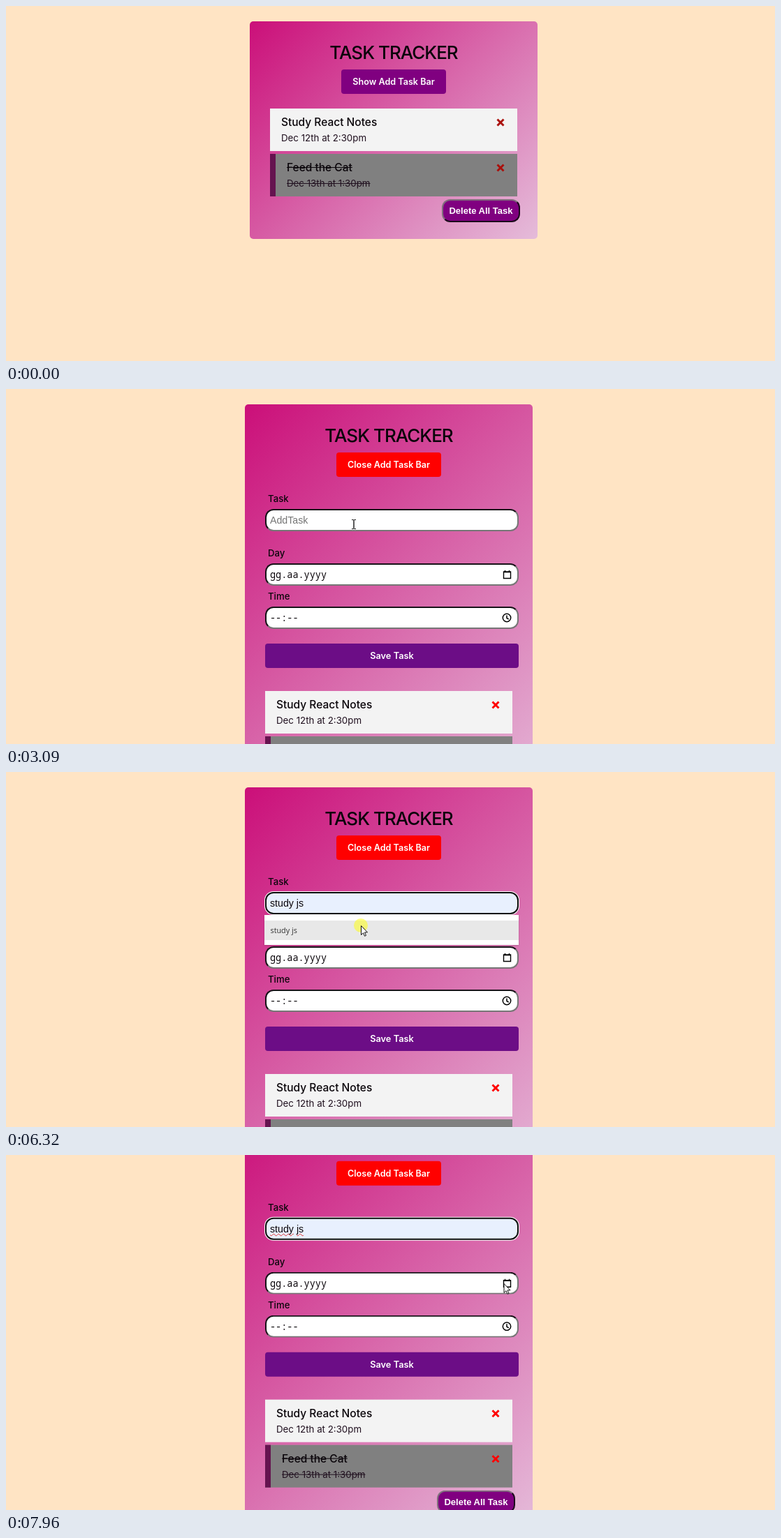
An HTML page for the animation above (8 s loop, 1101 px wide and 509 px high).

```html
<!DOCTYPE html>
<html lang="en">
<head>
<meta charset="utf-8">
<title>Task Tracker</title>
<style>
  * { box-sizing: border-box; }
  html, body { margin: 0; width: 100%; height: 100%; overflow: hidden; background: #ffe4c4; }
  body { position: relative; font-family: Inter, sans-serif; color: #0a050a; white-space: nowrap; }
  body div, #cursor { position: absolute; }

  #card { left: 349px; top: 22px; width: 412px; height: 312px; border-radius: 5px;
    background: linear-gradient(135deg, #cb0f79, #e5bcda); }
  #card.open { left: 342px; height: 598px; }
  #card.big { height: 322px; }
  #card.open.big { height: 608px; }

  #title { top: 25px; width: 100%; text-align: center; font: 500 26px/40px Inter, sans-serif; letter-spacing: -1px; }
  #toggle { left: 50%; top: 69px; width: 150px; height: 35px; transform: translateX(-50%); border-radius: 4px;
    background: #800080; color: #fff; text-align: center; font: 600 12.6px/35px Inter, sans-serif; }
  .big #toggle { width: 220px; height: 45px; font-size: 20.1px; line-height: 45px; }
  .open #toggle { background: #f00; }

  #content { left: 0; top: 0; width: 100%; }
  .big #content { top: 10px; }
  #form { display: none; left: 0; top: 0; width: 100%; }
  .open #form { display: block; }
  .label { left: 33px; font: 500 13.2px/20px Inter, sans-serif; }
  .field { left: 29px; width: 363px; height: 32.5px; padding-left: 5px; border: 2px solid;
    border-color: #181218 #767676 #767676 #181218; border-radius: 12px; background: #fff;
    font: 14.2px/28px "Liberation Sans", Arial, sans-serif; }
  .mono { font: 13.5px/29px "Noto Sans Mono", monospace; }
  .field svg { position: absolute; right: 8px; top: 7px; }
  .field.focus { border-color: #0c0c0c; box-shadow: 0 0 0 1px #fff; }
  .field.filled { background: #e8f0fe; }
  .hint { color: #757575; }
  .typo { text-decoration: underline wavy #e03030 .8px; text-underline-offset: 2px; text-decoration-skip-ink: none; }
  #caret { display: inline-block; width: 1px; height: 16px; margin-right: -1px; vertical-align: -3px; background: #000; }
  #save { left: 29px; top: 343px; width: 363px; height: 35px; border-radius: 4px; background: #6c0d86;
    color: #fff; text-align: center; font: 600 12.8px/35px Inter, sans-serif; }
  #menu { left: 28px; top: 183px; width: 364px; background: #fff; box-shadow: 0 1px 2px #0003;
    font: 10.8px/28px "Open Sans", sans-serif; color: #333; }
  #option { left: 0; right: 0; top: 8px; height: 28px; padding-left: 8.5px; }

  #list { left: 29px; top: 125px; width: 354px; }
  .open #list { top: 411px; }
  .task { left: 0; top: 0; width: 100%; height: 61px; background: #f3f3f3; }
  .task.done { top: 65px; background: #808080; border-left: 8px solid #65134f; }
  .task div { left: 16px; top: 10px; font: 500 15.5px/20px Inter, sans-serif; }
  .task div + div { top: 32px; font: 400 13.3px/20px Inter, sans-serif; color: #20101f; }
  .done div { text-decoration: line-through; }
  .task svg { position: absolute; right: 18px; top: 14px; stroke: #aa0f0b; }
  .open .task svg { stroke: #f00; }
  #delete { left: 246px; top: 130px; width: 112px; height: 33px; border: 2px solid;
    border-color: #80707c #1c0a1c #1c0a1c #80707c; border-radius: 12px; background: #800080; color: #fff;
    text-align: center; font: bold 13px/29px "Liberation Sans", Arial, sans-serif; }
  #cursor { left: 0; top: 0; overflow: visible; }
</style>
</head>
<body>
<div id="card">
  <div id="title">TASK TRACKER</div>
  <div id="toggle"></div>
  <div id="content">
    <div id="form">
      <div class="label" style="top:125px">Task</div>
      <div class="field" id="task" style="top:149.5px"><span id="typed"></span><i id="caret"></i><span class="hint" id="hint">AddTask</span></div>
      <div class="label" style="top:203px">Day</div>
      <div class="field mono" style="top:227.5px">gg.aa.yyyy<svg width="13" height="14" fill="none" stroke="#000" stroke-width="1.4"><path d="M1.5 3h10v9.5h-10zM1.5 3.6h10M3.5 1v2M9.5 1v2"/></svg></div>
      <div class="label" style="top:265px">Time</div>
      <div class="field mono" style="top:289.5px">--:--<svg width="14" height="14" fill="none" stroke="#000" stroke-width="1.5"><circle cx="7" cy="7" r="5.7"/><path d="M7 3.5v4l2.8 1.6"/></svg></div>
      <div id="save">Save Task</div>
    </div>
    <div id="list">
      <div class="task"><div>Study React Notes</div><div>Dec 12th at 2:30pm</div><svg width="12" height="12" stroke-width="2.9"><path d="M1.5 1.5l9 9m0-9l-9 9"/></svg></div>
      <div class="task done"><div>Feed the Cat</div><div>Dec 13th at 1:30pm</div><svg width="12" height="12" stroke-width="2.9"><path d="M1.5 1.5l9 9m0-9l-9 9"/></svg></div>
      <div id="delete">Delete All Task</div>
    </div>
    <div id="menu"><div id="option">study js</div></div>
  </div>
</div>
<svg id="cursor" width="1" height="1">
  <circle id="press" r="10" fill="#ff0" fill-opacity=".5"/>
  <path id="arrow" d="M.5 .5v13l3-2.8 2 4.6 2-.9-2-4.5h4z" fill="#fff" stroke="#111"/>
  <path id="hand" d="M-1.5 10V1.2q1.5-2 3 0V6q1.6-1 2.6.5 1.5-.8 2.5.6 1.9-.4 2 1.5v4q0 2-1.5 3.6V18h-7.4v-1.5L-5 11.8q-1.2-2 .5-2.6 1.2 0 3 2.3z" fill="#fff" stroke="#111"/>
  <path id="beam" d="M-3-6.5h2q1 0 1 1v11q0 1-1 1h-2M3-6.5H1q-1 0-1 1v11q0 1 1 1h2" fill="none" stroke="#222"/>
</svg>

<script>
const LOOP = 8000, BLINK = 530;
const $ = id => document.getElementById(id);
const within = (t, from, to) => t >= from && t < to;
const smooth = u => u * u * (3 - 2 * u);
const progress = (t, from, to) => smooth(Math.min(1, Math.max(0, (t - from) / (to - from))));

// Pointer stops: time, x, y
const stops = [
  [140, 1051, 484], [290, 785, 282], [450, 785, 282], [870, 549, 119],
  [2290, 549, 119], [2560, 498, 194], [5700, 498, 194], [5990, 508, 220],
  [6580, 508, 220], [6590, 509, 220], [6690, 509, 220], [7150, 645, 241],
  [7240, 645, 241], [7480, 646, 208], [7500, 646, 208], [7960, 712.5, 184],
];
// Typing: time, field value
const typing = [[4300, ""], [4640, "s"], [4710, "st"], [4910, "stu"], [6370, "study js"]];
const presses = [[1950, 2090], [4230, 4370], [6300, 6520]];

function pointerAt(t) {
  const i = stops.findIndex(s => s[0] > t);
  if (i < 0) return stops.at(-1).slice(1);
  if (i === 0) return stops[0].slice(1);
  const [t0, x0, y0] = stops[i - 1], [t1, x1, y1] = stops[i];
  const u = progress(t, t0, t1);
  return [x0 + (x1 - x0) * u, y0 + (y1 - y0) * u];
}

function show(id, on) {
  $(id).style.display = on ? "" : "none";
}

function drawField(t) {
  const [since, value] = typing.findLast(k => k[0] <= t) || [0, ""];
  const focused = t >= 4300, preview = within(t, 5840, 6370), chosen = t >= 6370;
  $("task").classList.toggle("focus", focused);
  $("task").classList.toggle("filled", preview || chosen);
  const text = preview ? "study js" : value;
  $("typed").innerHTML = chosen ? '<span class="typo">study</span> <span class="typo">js</span>' : text;
  show("hint", !text);
  show("caret", focused && !preview);
  $("caret").style.opacity = Math.floor((t - since) / BLINK) % 2 ? 0 : 1;

  show("menu", within(t, 4370, 6370));
  $("menu").style.height = t < 4640 ? "136px" : "43px";
  $("option").style.background = preview ? "#e8e8e8" : "";
}

function drawPointer(t) {
  const [x, y] = pointerAt(t);
  const shape = within(t, 800, 2420) ? "hand" : within(t, 2490, 5770) ? "beam" : "arrow";
  show("cursor", t >= 140);
  $("cursor").style.transform = `translate(${x}px, ${y}px)`;
  for (const id of ["arrow", "hand", "beam"]) show(id, id === shape);
  show("press", presses.some(([from, to]) => within(t, from, to)));
}

function draw(now) {
  const t = now % LOOP, open = t >= 2020;
  $("card").classList.toggle("open", open);
  $("card").classList.toggle("big", within(t, 800, 2420));
  $("card").style.transform = `translateY(${-82.3 * progress(t, 7160, 7480)}px)`;
  $("toggle").textContent = (open ? "Close" : "Show") + " Add Task Bar";
  drawField(t);
  drawPointer(t);
  requestAnimationFrame(draw);
}
draw(0);
</script>
</body>
</html>
```
